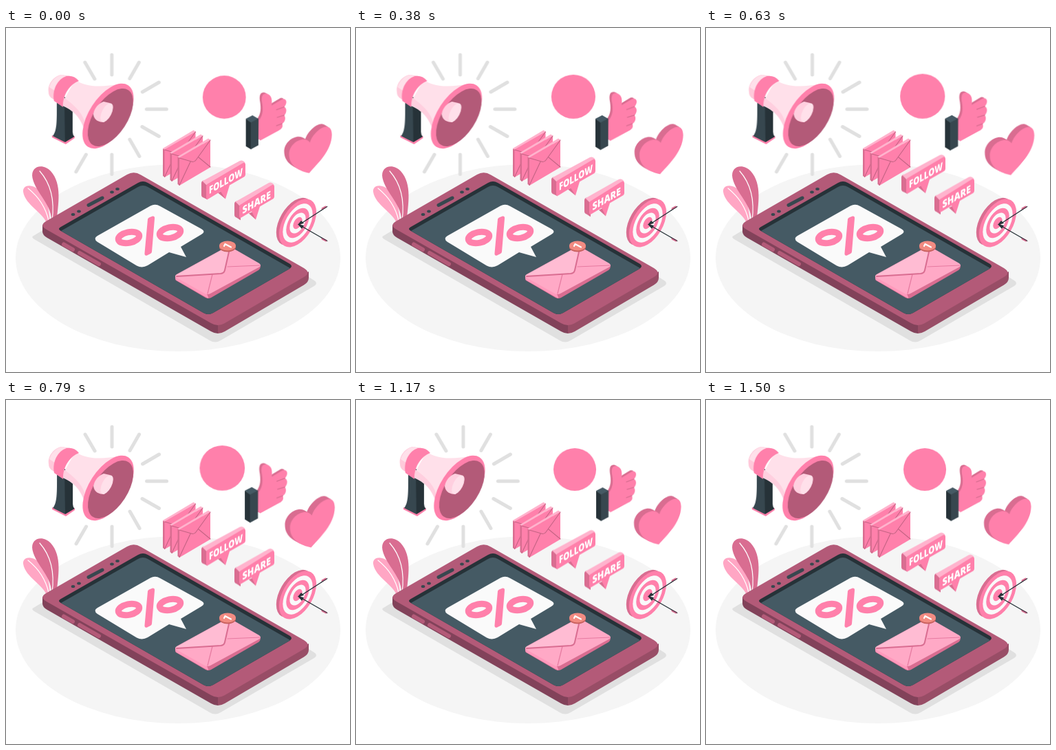
An HTML page for the animation above (1.54 s loop, 500x500 px).

```html
<!DOCTYPE html>
<html lang="en">
<head>
<meta charset="utf-8">
<title>Phone marketing</title>
<style>
html, body { margin: 0; width: 100%; height: 100%; overflow: hidden; background: #fff; }
svg { display: block; width: 100%; height: 100%; }
.shake, .pulse, .float { animation: 1540ms linear infinite; }
.shake { animation-name: shake; }
.pulse { animation-name: pulse; transform-origin: 381px 136px; }
.float { animation-name: float; }
@keyframes shake {
  0% { transform: translateX(-.2px); }
  7.5%, 85.4% { transform: translateX(-1px); }
  17.2%, 75.6% { transform: translateX(2px); }
  27%, 46.4%, 65.9% { transform: translateX(-4px); }
  36.7%, 56.2% { transform: translateX(4px); }
  95.1% { transform: none; }
  100% { transform: translateX(-.4px); }
}
@keyframes pulse {
  0% { transform: scale(1.012); }
  14.3%, 46.4% { transform: scale(1.082); }
  31.8%, 64%, 100% { transform: scale(1); }
}
@keyframes float {
  0%, 100% { transform: translateY(-.45px); }
  46.4% { transform: translateY(-10px); }
  95.1% { transform: none; }
}
.pink { fill: #ff80ab; }
.mid { fill: #d96d91; }
.deep { fill: #b35a78; }
.pale { fill: #ffa6c4; }
.light { fill: #ffe0ea; }
.slate { fill: #37474f; }
.ink { fill: #263238; }
.white { fill: #fafafa; }
.line { fill: none; stroke-linecap: round; stroke-linejoin: round; }
text { font: 800 15px "Open Sans", "Noto Sans", sans-serif; fill: #fff; }
</style>
</head>
<body>
<svg viewBox="0 0 500 500">
  <defs>
    <path id="heart" d="M440 210C426 207 411 200 411 183C411 166 433 155 441 166C446 149 472 131 472.500 155C472 179 451 197 440 210Z"/>
    <path id="hand" d="M368 134C374 126 374 118 372 107C371 98 374 95 379 96C386 98 387 104 386 113L401 104C408 102 409 110 404 115C409 117 407 125 404 127C407 131 405 137 401 139C403 144 400 147 396 149L370 163L367 161Z"/>
    <path id="screen" d="M79 289.500L192 225Q199 221 206 225L412 342.500Q418 346 412 350L301 414Q294 418 287 414L79 294.500Q75 292 79 289.500Z"/>
    <clipPath id="inner"><use href="#screen"/></clipPath>
    <g id="mail">
      <path class="mid" d="M249.500 187L252.500 189V229L249.500 227Z"/>
      <path fill="#ffb3cd" d="M249.500 187L294 160.500L297 162.500L252 189Z"/>
      <path class="pink" d="M252 188.500L297 162.500V202.500L252 229Z"/>
      <path class="line" stroke="#c46384" stroke-width="1.100" d="M252 189L271 194.500Q274 195 276 192L297 163M252 228.500L268 194.500M297 202L280 188"/>
    </g>
  </defs>

  <ellipse cx="250" cy="334" rx="236" ry="136" fill="#f5f5f5"/>
  <path fill="#e0e0e0" d="M40 302L60 290L440 362L448 367Q454 371 448 375L312 454Q304 459 296 454L41 307Q36 304 40 302Z"/>

  <!-- leaves -->
  <path class="pale" d="M60 286C55 268 28 258 25 238C24 226 42 226 52 240C62 254 63 268 64 286Z"/>
  <path class="mid" d="M66 284C69 258 43 240 38.500 218C35 200 54 196 65 208C82 227 76 256 73 284Z"/>
  <path class="line" stroke="#fff" stroke-width="1.200" d="M32 233C47 245 58 262 62 280M49 208C65 226 71 250 67 280"/>

  <!-- phone -->
  <path fill="#82425a" d="M53 286V296Q53 301 60 305L298 441Q303 444 308 444V420Z"/>
  <path fill="#984d66" d="M308 444Q313 444 318 441L433 373.500Q440 369.500 440 363V354L308 420Z"/>
  <path class="deep" d="M58 281L176 213Q186 207.500 196 213.500L433 349Q444 355.500 433 362L318 429Q308 435 298 429L59 293Q48 287 58 281Z"/>
  <path class="line" stroke="#b35a78" stroke-width="6" d="M84 314.500L97 322M107 327L135 343"/>
  <path class="line" stroke="#37474f" stroke-width="5" d="M120 257.500L140 247"/>
  <g class="slate">
    <ellipse cx="97.500" cy="271" rx="2.800" ry="2"/>
    <ellipse cx="106" cy="266.500" rx="2.800" ry="2"/>
    <ellipse cx="154" cy="238.500" rx="2.800" ry="2"/>
    <ellipse cx="162" cy="234" rx="2.800" ry="2"/>
  </g>
  <use href="#screen" class="ink"/>
  <g clip-path="url(#inner)"><use href="#screen" y="6" fill="#455a64"/></g>

  <!-- discount bubble -->
  <path class="white" d="M133 302L210 258.500Q217 255 224 259L284 292Q291 296 284 300L254 318L262 333L237 326L206 345Q198 349.500 190 345.500L133 311Q126 306 133 302Z"/>
  <g class="line" stroke="#ff80ab" stroke-width="9">
    <ellipse cx="178.500" cy="304.500" rx="15.500" ry="7.800" transform="rotate(-12 178.500 304.500)"/>
    <ellipse cx="238.500" cy="297.500" rx="15.500" ry="7.800" transform="rotate(-12 238.500 297.500)"/>
  </g>
  <path class="pink" d="M208 275.500L213 273.500Q216.500 273 216 277L212 325Q212 327 210 328L205 330.500Q201 331.500 201.500 327L206 278Q206 276.500 208 275.500Z"/>

  <!-- large envelope -->
  <path class="mid" d="M246 360V365Q246 367 249 368L290 392Q294 394 298 392L367 352Q370 350 370 345L293 374Z"/>
  <path fill="#ff99bc" d="M246 361L249 359L290 384Q294 389 294 393L290 391L248 367Q246 366 246 361Z"/>
  <path fill="#ffa9c6" d="M248 358L320 318.500Q324 316.500 328 319L368 342Q372 345 368 347.500L297 386Q293 388 289 386L248 363Q244 360.500 248 358Z"/>
  <path class="line" stroke="#e67aa0" stroke-width="1.200" d="M293 386L300 358M369 345L322 347"/>
  <path fill="#ffbcd3" d="M247 359.500L322 318Q325 317 325 320L318 353Q317 357 312 357Z"/>
  <path class="line" stroke="#d96d91" stroke-width="2" d="M248 361L312 357Q317 356.500 318 352L325 321"/>
  <ellipse cx="322" cy="318.500" rx="12" ry="7" fill="#c9615f"/>
  <ellipse cx="322" cy="316.500" rx="12" ry="7" fill="#f28b82"/>
  <path class="line" stroke="#fff" stroke-width="2.200" d="M317 317L318.500 314L327 318.500"/>

  <!-- megaphone -->
  <g class="shake">
    <path class="line" stroke="#e0e0e0" stroke-width="5" d="M154 39V68M115 50L129 74M193.500 50L180 73.500M222.500 79L198.500 93M204.500 118H233.500M198 143.500L222.500 157.500M180 162L194 186.500M154 184V212.500M116.500 184L102 209"/>
    <path class="pink" d="M67 156L87 165L100 157V160L87 169L67 159Z"/>
    <path class="slate" d="M74 98L86 104V166L68 157C75 149 74 132 74 98Z"/>
    <path class="ink" d="M85 100L97 110V151Q97 155 99.500 158L86 166Z"/>
    <path fill="#ffc9da" d="M62 93C60 82 70 69 81 68L94 70L75 105C67 104 62 100 62 93Z"/>
    <path class="light" d="M63 86C66 76 74 69 82 68L91 71L75 94Z"/>
    <path class="light" d="M101 75C116 87 140 86 168 81L118 166C114 141 106 122 80 112Z"/>
    <path fill="#ffcfdf" d="M81 99C99 111 113 124 116 142L118 160C112 137 104 121 82 112Z"/>
    <path class="pink" d="M88 70Q99 68 106 77C94 81 82 97 83 115L70 106C67 90 75 74 88 70Z"/>
    <ellipse class="pink" cx="148.500" cy="128" rx="53.500" ry="27.500" transform="rotate(-57 148.500 128)"/>
    <ellipse class="deep" cx="152" cy="130" rx="47.500" ry="24.500" transform="rotate(-57 152 130)"/>
    <path fill="#ffcfdf" d="M127 125C129 116 134 110 142 107L151 109L143 137C135 137 128 134 127 125Z"/>
    <ellipse class="light" cx="146.500" cy="123" rx="15" ry="7" transform="rotate(-63 146.500 123)"/>
  </g>

  <!-- social icons -->
  <g class="pulse">
    <circle class="pink" cx="318" cy="101" r="31"/>
    <use href="#hand" class="mid" x="-3" y="-1.500"/>
    <use href="#hand" class="pink"/>
    <path class="line" stroke="#d96d91" stroke-width="1.200" d="M393 119L404 115M394 130L404 127M393 142L401 139"/>
    <path fill="#455a64" d="M349 132L358.500 127L367 132L356.500 138Z"/>
    <path class="ink" d="M349 132L356.500 137.500V176L349 171.500Z"/>
    <path class="slate" d="M356 137.500L367 131.500V170L356 176Z"/>
    <use href="#heart" class="mid" x="-7" y="-4"/>
    <use href="#heart" class="mid" x="-5" y="-3"/>
    <use href="#heart" class="mid" x="-2.500" y="-1.500"/>
    <use href="#heart" class="pink"/>
  </g>

  <!-- small envelopes -->
  <use href="#mail" x="-21.500" y="-12"/>
  <use href="#mail" x="-11" y="-6"/>
  <use href="#mail"/>

  <!-- buttons -->
  <g class="float">
    <path class="mid" d="M284 226Q284 223 287 222L293 227V250L287 247Q284 246 284 243ZM308 240L317 236L319 249Z"/>
    <path fill="#ffb3cd" d="M285.500 223L340 193.500Q343 192 346 194.500L347.500 196.500L291.500 229Z"/>
    <path class="pink" d="M291 231Q291 228 294 226.500L344 197Q348 195 348 199V213Q348 216 345 217.500L325 229L319 249L312 238L294 249Q291 250.500 291 247Z"/>
    <text transform="matrix(.76 -.43 0 1 295 242)">FOLLOW</text>
    <path class="mid" d="M332 256Q332 253 335 252L341 257V280L335 276Q332 275 332 272ZM353 270L362 266L363 279Z"/>
    <path fill="#ffb3cd" d="M333.500 253L382 225.500Q385 224 388 226.500L389.500 228.500L339.500 259Z"/>
    <path class="pink" d="M339 261Q339 258 342 256.500L386 229Q390 227 390 231V245Q390 248 387 249.500L369 260L363 279L357 267L342 276Q339 277.500 339 274Z"/>
    <text transform="matrix(.84 -.48 0 1 343.500 271)">SHARE</text>
  </g>

  <!-- target -->
  <g transform="translate(424 283.500) rotate(-60)">
    <ellipse class="mid" cx="-.5" cy="-5" rx="38" ry="21.500"/>
    <ellipse class="pink" rx="38.500" ry="22"/>
    <ellipse class="white" rx="31" ry="17.500"/>
    <ellipse class="pink" rx="24" ry="13.500"/>
    <ellipse class="white" rx="16.500" ry="9.500"/>
    <ellipse class="pink" rx="9.500" ry="5.500"/>
  </g>
  <path class="line" stroke="#263238" stroke-width="1.400" d="M426 286L466 260M426 286L466 309"/>
  <path class="ink" d="M424 286L429 280L433 284ZM424 285L433 287L430 292Z"/>
  <path class="line" stroke="#d96d91" stroke-width="3" d="M460 262.500L464.500 260M460 306.500L465 309"/>
  <path class="line" stroke="#263238" stroke-width="1" d="M458 265L467 259.500M458 304.500L467 309.500"/>
</svg>
</body>
</html>
```
